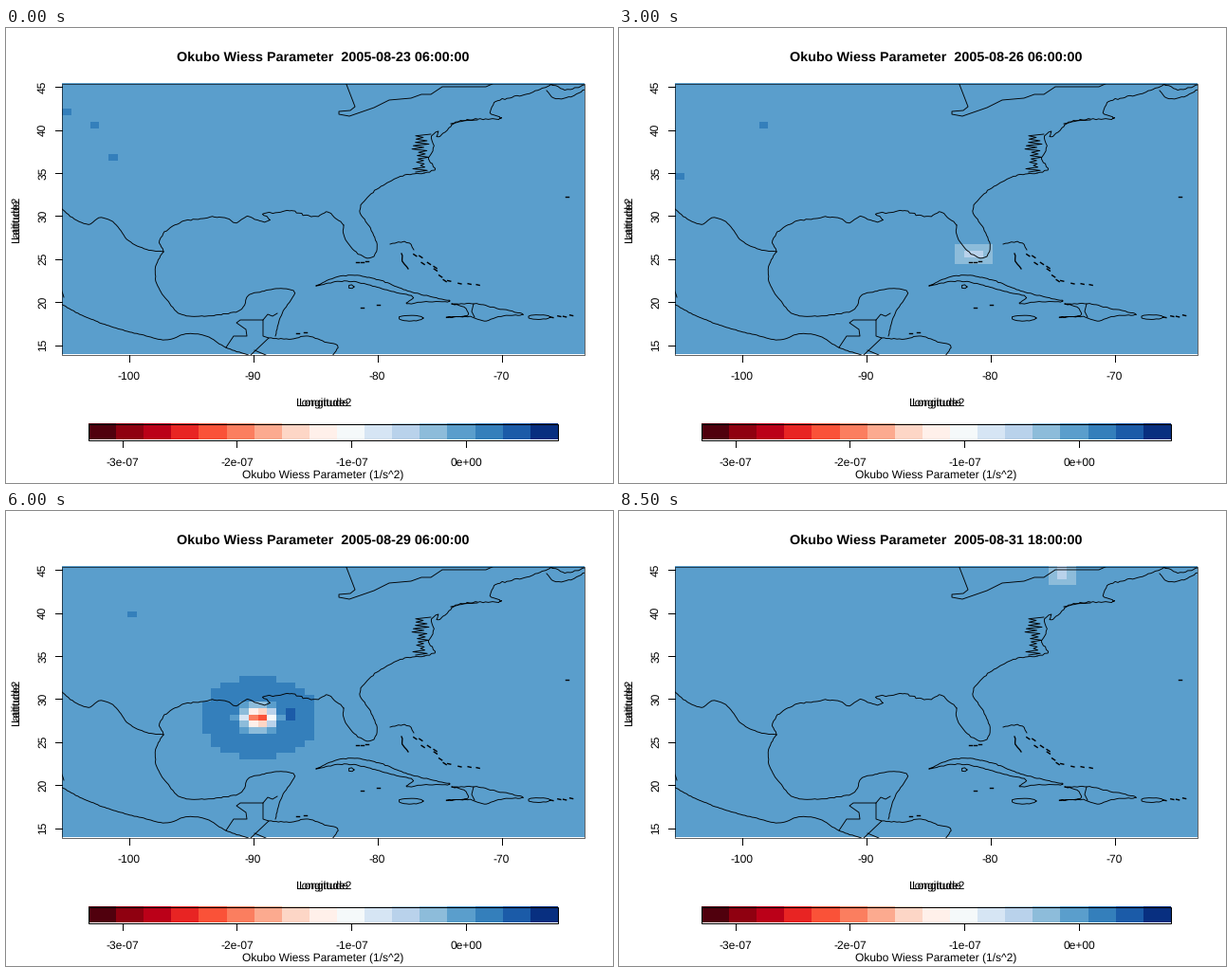
Write a matplotlib script that moves like this. It is 640 px wide and 480 px high and loops after 8.75 s.

```python
import numpy as np
import matplotlib.pyplot as plt
from matplotlib.animation import FuncAnimation
from matplotlib.colors import ListedColormap
from matplotlib.patches import Rectangle

W, H, FRAMES, STEP_MS = 640, 480, 35, 250
PT = 0.72                                   # points per pixel at 100 dpi
LEFT, RIGHT, TOP, BOTTOM = 58.5, 609.5, 58.5, 344.5
COLS, ROWS, CALM = 56, 42, 13
COLORS = ["#50000d", "#8f0010", "#bb0018", "#e82423", "#fa5238", "#fb7e5f",
          "#fcaa8f", "#fdd6c6", "#fff0ea", "#f5f9fa", "#d6e5f4", "#b9d2eb",
          "#8dbcda", "#5a9ecc", "#347fbb", "#1b5ba8", "#082f80"]
CMAP = ListedColormap(COLORS)

plt.rcParams.update({"font.family": "Liberation Sans", "text.hinting": "none"})
fig = plt.figure(figsize=(W / 100, H / 100), dpi=100, facecolor="white")
ax = fig.add_axes([0, 0, 1, 1])
ax.axis("off")
rng = np.random.default_rng(5)


def color_grid(data, x0, x1, y0, y1, edge):
    """Cells in level colours inside a thin outline."""
    img = ax.imshow(data, cmap=CMAP, vmin=-0.5, vmax=16.5, aspect="auto",
                    extent=(x0, x1, y1, y0), interpolation="nearest")
    box = Rectangle((x0, y0), x1 - x0, y1 - y0, fill=False, lw=edge * PT,
                    ec="black", zorder=4)
    ax.add_patch(box)
    ax.set(xlim=(0, W), ylim=(H, 0))
    return img, box


def line(xs, ys, width=1.0):
    return ax.plot(xs, ys, color="black", lw=width * PT, zorder=3,
                   solid_joinstyle="round")[0]


def text(x, y, s, size=12, **kw):
    return ax.text(x, y, s, fontsize=size * PT, ha="center", va="baseline",
                   rotation_mode="anchor", **kw)


def path(*points, width=0.9):
    line(*zip(*points), width).set_clip_path(frame_box)


def coast(*points, rough=0.3, width=0.9):
    """Smooth curve through key points, made ragged by seeded noise."""
    p = np.array(points, float)
    s = np.r_[0, np.cumsum(np.hypot(*np.diff(p, axis=0).T))]
    slope = np.gradient(p, s, axis=0)
    u = np.linspace(0, s[-1], max(4, int(s[-1] / 2.5)))
    i = np.clip(np.searchsorted(s, u) - 1, 0, len(s) - 2)
    d = (s[i + 1] - s[i])[:, None]
    t = (u - s[i])[:, None] / d
    q = (p[i] * (1 + 2 * t) * (1 - t) ** 2 + p[i + 1] * t * t * (3 - 2 * t)
         + d * t * (1 - t) * (slope[i] * (1 - t) - slope[i + 1] * t))
    q[1:-1] += rng.uniform(-rough, rough, q[1:-1].shape)
    path(*q, width=width)


def oval(x, y, rx, ry):
    a = np.linspace(0, 2 * np.pi, 20)
    coast(*zip(x + rx * np.cos(a), y + ry * np.sin(a)))


def isles(a, b, n, spread=0.0):
    """Short strokes scattered from a to b."""
    for t in np.linspace(0, 1, n):
        x, y = np.add(a, np.subtract(b, a) * t) + rng.uniform(-spread, spread, 2)
        path((x - 1.5, y - spread / 3), (x + 1.5, y + spread / 3), width=1.4)


def draw_north():
    coast((58, 190), (70, 200), (88, 207), (99, 200), (112, 204), (130, 225),
          (150, 234), (166, 236))
    coast((166, 236), (162, 226), (170, 213), (188, 204), (204, 201), (230, 200),
          (245, 205), (254, 199), (268, 204), (279, 203), (271, 196), (285, 195),
          (300, 193), (318, 198), (331, 198), (337, 194), (350, 203), (356, 208),
          rough=0.8)
    coast((356, 208), (356, 219), (368, 235), (376, 241), (386, 242), (391, 234),
          (385, 213), (373, 191), (386, 174), (403, 163), (418, 156), (441, 153),
          rough=0.5)
    # Sounds and bays as a ragged zigzag, then on to Nova Scotia
    ys = np.linspace(152, 112, 24)
    side = np.resize([-1, 1], ys.size)
    path(*zip(438 + side * rng.uniform(1, 10, ys.size), ys))
    coast((441, 153), (452, 149), (446, 138), (451, 126), (448, 116), (456, 109),
          (454, 115), (463, 110), (470, 102), rough=0.8)
    coast((469, 101), (484, 98), (497, 97))
    coast((470, 102), (480, 98), (500, 96), (522, 95), (511, 90), (514, 80),
          (535, 73), (560, 66), (572, 61), (580, 58), rough=0.8)
    coast((570, 66), (578, 74), (590, 74), (611, 65), rough=0.6)
    coast((574, 59), (590, 65), (611, 60), rough=0.7)
    path((358, 57), (368, 83), (363, 87), (351, 88), (351, 91), (362, 93),
         (388, 84), (404, 76), (427, 74), (438, 70), (448, 70), (460, 62),
         (506, 62), (515, 58))


def draw_south():
    coast((166, 236), (159, 248), (158, 266), (172, 290), (182, 301), (206, 304),
          (228, 302), (249, 296), (256, 282), (270, 278), (290, 275), (304, 278),
          (294, 296), (288, 308), (284, 325), rough=0.4)
    coast((58, 291), (76, 301), (105, 313), (145, 324), (172, 329), (188, 323),
          (208, 324), (232, 337), (258, 346))
    path((232, 337), (240, 325), (254, 325), (253, 318), (243, 311), (247, 308),
         (271, 308), (271, 325), (277, 327), (258, 345))
    path((271, 308), (276, 302), (281, 304), (286, 301))
    path((262, 340), (274, 345))
    coast((277, 327), (300, 328), (318, 325), (336, 331), (350, 336), (344, 346),
          rough=0.4)
    coast((58, 275), (61, 284))


def draw_islands():
    coast((327, 272), (345, 264), (363, 261), (394, 266), (420, 276), (450, 284),
          (468, 288), (440, 289), (422, 290), (429, 285), (407, 278), (390, 273),
          (358, 267), (327, 272), rough=0.5)
    coast((470, 291), (495, 291), (519, 296), (545, 302), (522, 304), (503, 309),
          (492, 305), (464, 305), (488, 301), (485, 296), (470, 291), rough=0.5)
    path((493, 291), (491, 299), (494, 305))
    oval(364, 273, 3, 2)
    oval(427, 306, 13, 3)
    oval(562, 305, 12, 2.3)
    coast((405, 228), (413, 226), (426, 227), (430, 234), rough=0.8)
    coast((417, 238), (418, 246), (424, 254), rough=1, width=1.3)
    isles((432, 239), (464, 264), 8, 3)
    isles((468, 267), (498, 272), 4, 1)
    isles((576, 306), (597, 303), 4, 1)
    isles((370, 247), (380, 246), 3)
    isles((375, 295), (392, 292), 2)
    isles((307, 322), (315, 321), 2)
    isles((591, 178), (591, 178), 1)


def draw_axes():
    for lon in (-100, -90, -80, -70):
        x = 129.5 + 13.1 * (lon + 100)
        line([x, x], [BOTTOM, 352])
        text(x - 0.5, 371, str(lon))
    for lat in range(15, 50, 5):
        y = 334.5 - 9.07 * (lat - 15)
        line([52, LEFT], [y, y])
        text(42, y, str(lat), rotation=90)
    for suffix in ("", "2"):
        text(334.5, 400, "Longitude" + suffix)
        text(13.5, 202, "Latitude" + suffix, rotation=90)


def draw_colorbar():
    color_grid([range(len(COLORS))], 86.5, 581.5, 417.5, 434.5, 1)
    for i, label in enumerate(("-3e-07", "-2e-07", "-1e-07", "0e+00")):
        x = 122.5 + 120.8 * i
        line([x, x], [435, 442])
        text(x + 0.5, 462, label)
    text(334.5, 476, "Okubo Wiess Parameter (1/s^2)")


# Storm keys: step, column, row, core depth, core area, ring radius,
# strength and bearing (degrees) of the strongest part of the ring
KEYS = np.array([
    (8, 36, 26, 0.4, 3.0, 0.1, 0.0, 0),
    (12, 31.4, 26, 1.7, 3.0, 0.1, 0.0, 0),
    (16, 28, 28, 6, 1.8, 3.0, 0.3, 0),
    (20, 24.1, 26.5, 15, 1.3, 4.8, 0.9, 0),
    (24, 20.6, 23, 11, 2.6, 6.3, 0.7, 10),
    (28, 21.6, 15.2, 9, 2.4, 6.1, 2.5, 78),
    (31, 27, 9, 4, 2.5, 3.5, 0.8, 85),
    (34, 41, 0.8, 2.2, 2.2, 0.1, 0.0, 90)]).T


def storm(k):
    """Negative vortex core inside a positive ring of strain."""
    cx, cy, depth, area, radius, lobe, bearing = (
        np.interp(k, KEYS[0], key) for key in KEYS[1:])
    y, x = np.mgrid[:ROWS, :COLS]
    dx, dy = x - cx, y - cy
    r2 = dx ** 2 + dy ** 2
    a = np.radians(bearing)
    lobe_r2 = (dx - 3.4 * np.cos(a)) ** 2 + (dy + 3.4 * np.sin(a)) ** 2
    return (1.3 * np.exp(-(r2 / radius ** 2) ** 3) + lobe * np.exp(-lobe_r2 / 1.5)
            - depth * np.exp(-r2 / area))


def field(k):
    f = np.full((ROWS, COLS), CALM)
    cells = np.random.default_rng(k)
    for _ in range(cells.integers(0, 4)):   # stray cells over the western land
        f[cells.integers(4, 15), cells.integers(0, 10)] += 1
    if k >= KEYS[0, 0]:
        f += np.rint(storm(k)).astype(int)
    return np.clip(f, 0, 16)


def update(k):
    days, hour = divmod(6 + 6 * k, 24)
    title.set_text(f"Okubo Wiess Parameter  2005-08-{23 + days} {hour:02d}:00:00")
    image.set_data(field(k))
    return image, title


image, frame_box = color_grid(field(0), LEFT, RIGHT, TOP, BOTTOM, 0.6)
draw_north()
draw_south()
draw_islands()
draw_axes()
draw_colorbar()
title = text(334.5, 35, "", 14.4, weight="bold")
anim = FuncAnimation(fig, update, frames=FRAMES, interval=STEP_MS, repeat=True,
                     repeat_delay=0, blit=False)
plt.show()
```
